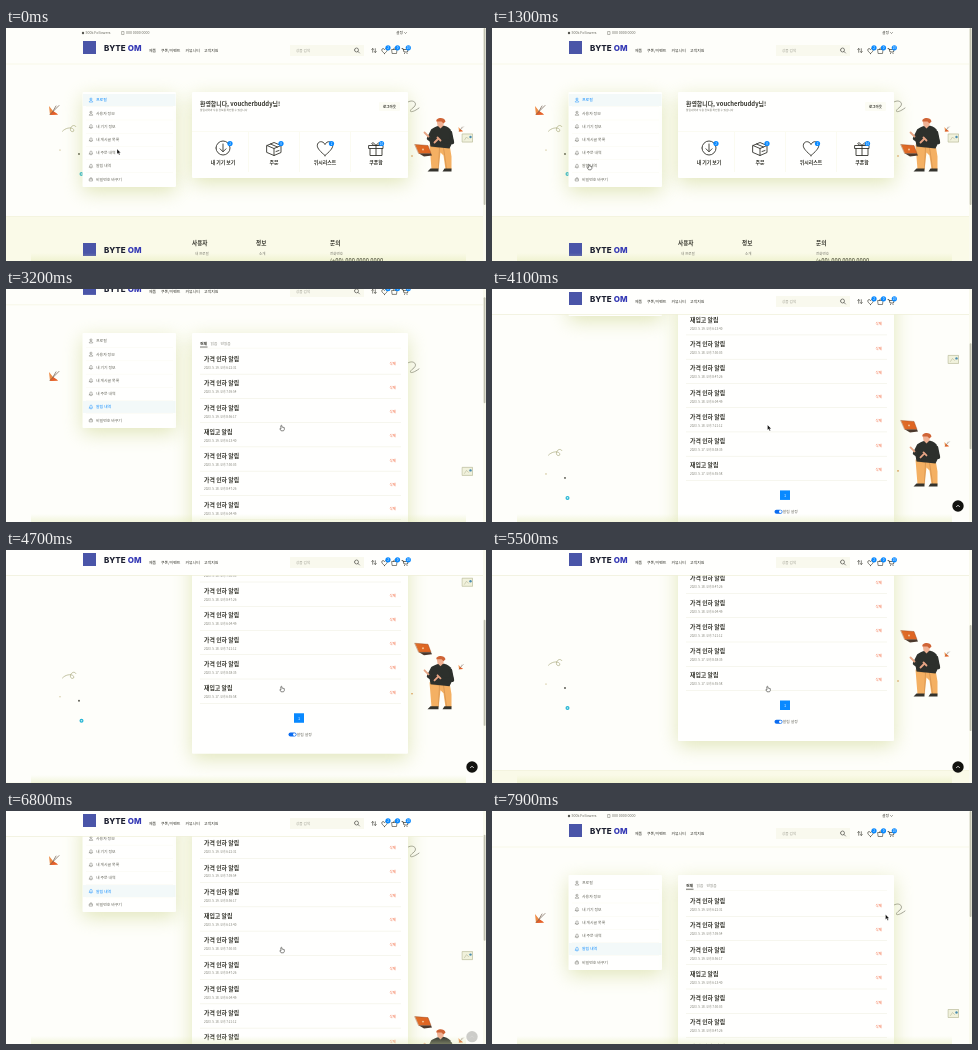
Recreate the animation shown at these times as an HTML page with a canvas. Size 480 by 233 pixels, loop 8000 ms.

```html
<!DOCTYPE html>
<html lang="ko">
<head>
<meta charset="utf-8">
<title>알림 내역</title>
<style>
html, body { margin: 0; width: 100%; height: 100%; overflow: hidden; background: #fefefa; }
canvas { display: block; width: 480px; height: 233px; }
</style>
</head>
<body>
<canvas id="stage" width="480" height="233"></canvas>
<script>
const cv = document.getElementById('stage');
const c = cv.getContext('2d');
const W = 480, H = 233, LOOP = 8000;
const dpr = window.devicePixelRatio || 1;
cv.width = W * dpr;
cv.height = H * dpr;

const FONT = '"Noto Sans CJK KR", "Noto Sans CJK", "Noto Sans", sans-serif';
const BRAND_FONT = 'Inter, "Open Sans", sans-serif';
const INK = '#33332b', BLUE = '#0989ff', RED = '#f2653c', GREY = '#85857c', BG = '#fefefa';
const PAGE_SWITCH = 1400, ROW = 24.25;

const MENU = ['프로필', '사용자 정보', '내 기기 정보', '내 게시글 목록', '내 주문 내역', '알림 내역', '비밀번호 바꾸기'];

// [time, value...] keys
const SCROLL = [[0, 0], [2450, 0], [2900, 6], [3200, 20], [3600, 66], [4100, 132], [4500, 163],
  [5000, 181], [5300, 183], [5850, 183], [6300, 138], [6800, 58], [7200, 16], [7650, 0], [8000, 0]];
const POINTER = [[0, 111, 121], [300, 110, 123], [900, 97, 136], [1500, 97, 136], [2100, 275.5, 136],
  [7800, 275.5, 136], [7880, 393.5, 103.5], [8000, 393.5, 103.5]];

const clamp = v => Math.max(0, Math.min(1, v));
const mix = (a, b, k) => a + (b - a) * k;

function at(keys, t, i = 1) {
  let n = 1;
  while (n < keys.length - 1 && t > keys[n][0]) n++;
  const a = keys[n - 1], b = keys[n];
  return mix(a[i], b[i], clamp((t - a[0]) / (b[0] - a[0])));
}

function text(s, x, y, size, color = INK, weight = 400, align = 'left', font = FONT) {
  c.font = `${weight} ${size}px ${font}`;
  c.textAlign = align;
  c.textBaseline = 'middle';
  c.fillStyle = color;
  c.fillText(s, x, y);
}

function rect(x, y, w, h, color) {
  c.fillStyle = color;
  c.fillRect(x, y, w, h);
}

function pill(x, y, w, h, r, color) {
  c.beginPath();
  c.roundRect(x, y, w, h, r);
  c.fillStyle = color;
  c.fill();
}

function disc(x, y, r, color) {
  c.beginPath();
  c.arc(x, y, r, 0, 7);
  c.fillStyle = color;
  c.fill();
}

// Draws an SVG path moved to x, y
function shape(d, x, y, fill, stroke, lw = 0.8, k = 1) {
  const p = new Path2D(d);
  c.save();
  c.translate(x, y);
  c.scale(k, k);
  c.lineCap = c.lineJoin = 'round';
  if (fill) { c.fillStyle = fill; c.fill(p); }
  if (stroke) { c.strokeStyle = stroke; c.lineWidth = lw; c.stroke(p); }
  c.restore();
}

const HEART = 'M0 5 C-3 2.5 -5.5 0 -5.5 -2 C-5.5 -5.5 -1.2 -5.8 0 -2.8 C1.2 -5.8 5.5 -5.5 5.5 -2 C5.5 0 3 2.5 0 5Z';
const USER = 'M-1.7 1.7C-1.7 0 1.7 0 1.7 1.7ZM-1 -1A1 1 0 1 0 1 -1A1 1 0 1 0 -1 -1';
const BELL = 'M-1.7 1.2H1.7L1.1 .3V-.8C.8 -2.2 -.8 -2.2 -1.1 -.8V.3ZM-.4 1.9H.4';
const LOCK = 'M-1.4 -.3H1.4V1.8H-1.4ZM-.9 -.3C-.9 -2.3 .9 -2.3 .9 -.3';

function badge(x, y, n) {
  disc(x, y, 2.6, BLUE);
  text(n, x, y + 0.2, 3.1, '#fff', 500, 'center');
}

function card(x, y, w, h) {
  c.save();
  c.shadowColor = 'rgba(196,206,120,.5)';
  c.shadowBlur = 19 * dpr;
  c.shadowOffsetY = 5 * dpr;
  pill(x, y, w, h, 1, '#fffffe');
  c.restore();
}

function brand(y) {
  rect(77, y - 8, 13, 13, '#4a55a8');
  text('BYTE', 98, y, 8, '#1d2030', 800, 'left', BRAND_FONT);
  text('OM', 135.5, y, 8, '#3438b4', 800, 'right', BRAND_FONT);
}

function header(dy, sticky) {
  c.save();
  c.translate(0, dy);
  if (sticky) {
    rect(0, 0, W, 35, '#fffffd');
    rect(0, 35, W, 0.7, '#efefd8');
  } else {
    rect(0, 35.7, W, 0.6, '#f1f1da');
    disc(77, 5, 1.2, '#56564f');
    text('500k Followers', 79.5, 5, 3.6, '#66665c');
    shape('M-1 -1.5H1V1.5H-1Z', 117, 5, null, '#77776c', 0.5);
    text('000 0000 0000', 120, 5, 3.6, '#66665c');
    text('설정', 390, 5, 3.8, INK, 500);
    shape('M-1 -.5L0 .5L1 -.5', 399.5, 5, null, INK, 0.5);
  }
  brand(21);
  [['제품', 143], ['쿠폰/이벤트', 155], ['커뮤니티', 179.5], ['고객지원', 198]]
    .forEach(([s, x]) => text(s, x, 22.5, 3.9, INK, 500));
  pill(284, 17, 74, 11, 0.5, '#f9f9ee');
  text('상품 검색', 290, 22.5, 3.6, '#a3a397');
  shape('M-2 0A2 2 0 1 0 2 0A2 2 0 1 0 -2 0M1.5 1.5L3 3', 350.5, 22, null, '#3c3c36', 0.6);
  shape('M-1.3 1.8V-2L-2.3 -1M-1.3 -2L-.4 -1M1.3 -1.8V2L.4 1M1.3 2L2.3 1', 368, 22.5, null, INK, 0.6);
  shape(HEART, 378.5, 23, null, INK, 1.3, 0.5);
  shape('M-2.5 -1H2.5L2 3H-2ZM-1.2 -1C-1.2 -3 1.2 -3 1.2 -1', 388.5, 22.5, null, INK, 0.6);
  shape('M-3 -2H-2L-1 1.5H2.5L3 -1H-1.7M-.5 3H-.4M2 3H2.1', 399, 22.5, null, INK, 0.7);
  badge(382, 19.8, '2');
  badge(391.5, 19.8, '0');
  badge(402.3, 19.8, '10');
  c.restore();
}

function sidebar(active) {
  card(76.5, 64, 93.5, 95);
  MENU.forEach((s, i) => {
    const y = 72 + i * 13.2, on = i === active;
    if (on) rect(77, y - 6, 92.5, 12, '#f3f9f9');
    const col = on ? BLUE : '#66665c';
    const icon = i < 2 ? USER : i < 6 ? BELL : LOCK;
    shape(icon, 85, y, null, col, 0.45);
    text(s, 90, y, 3.9, col);
    if (i) rect(80, y - 6.6, 87, 0.4, '#f8f8ea');
  });
}

function dashboard() {
  card(186, 64, 216, 86);
  text('환영합니다, voucherbuddy님!', 194, 75.3, 5.9, INK, 700);
  text('알림내역과 사용 정보를 확인할 수 있습니다', 194, 81.8, 2.7, '#77776c');
  pill(373, 74, 21, 9, 1, '#fcfcf4');
  text('로그아웃', 383.5, 78.3, 3.5, INK, 600, 'center');
  rect(186, 103, 216, 0.5, '#f6f6e4');
  [242, 293, 344].forEach(x => rect(x, 104, 0.5, 40, '#f6f6e4'));
  const col = '#34342e';
  shape('M-7 0A7 7 0 1 0 7 0A7 7 0 1 0 -7 0M0 -4V3.5M-3 .8L0 3.8L3 .8', 217, 120, null, col, 0.9);
  shape('M-7 -3L0 -6L7 -3V4L0 7L-7 4ZM-7 -3L0 0L7 -3M0 0V7M-3.5 -4.5L3.5 -1.5M2 3L5 2', 268, 120.5, null, col, 0.9);
  shape(HEART, 319, 120.5, null, col, 0.65, 1.4);
  shape('M-7 -3H7V0H-7ZM-6 0V7H6V0M0 -3V7M0 -3C-7 -3 -4 -9 0 -3C4 -9 7 -3 0 -3', 370, 120.5, null, col, 0.9);
  [['내 기기 보기', 217, 224, '2'], ['주문', 268, 275, '0'], ['위시리스트', 319, 325.5, '2'], ['쿠폰함', 370, 375.5, '10']]
    .forEach(([s, x, bx, n]) => {
      text(s, x, 134, 4.9, INK, 600, 'center');
      badge(bx, 115.5, n);
    });
}

function alerts() {
  card(186, 64, 216, 310);
  text('전체', 194, 75, 3.9, INK, 700);
  rect(194, 77.8, 7.5, 0.7, INK);
  text('읽음', 204.5, 75, 3.7, GREY);
  text('안읽음', 214.5, 75, 3.7, GREY);
  rect(194, 79, 201, 0.4, '#f3f3e2');
  for (let i = 0; i < 10; i++) {
    const y = 90 + i * ROW;
    text(i === 3 || i === 9 ? '재입고 알림' : '가격 인하 알림', 198, y, 5.9, INK, 700);
    const mm = String((i * 17 + 22) % 60).padStart(2, '0');
    const ss = String((i * 23 + 31) % 60).padStart(2, '0');
    text(`2023. 5. ${19 - (i >> 2)}. 오후 ${6 + i % 3}:${mm}:${ss}`, 198, y + 9, 3, '#77776c');
    text('삭제', 390, y + 4.3, 3.5, RED, 500, 'right');
    rect(194, y + 15, 201, 0.5, '#ededdc');
  }
  rect(288, 333.5, 10, 9.5, BLUE);
  text('1', 293, 338.5, 3.8, '#fff', 500, 'center');
  pill(282.5, 352.8, 8, 4, 2, '#0b6cf0');
  disc(288.4, 354.8, 1.4, '#fff');
  text('알림 설정', 290.8, 354.8, 3.8, '#66665c');
}

function laptop(x, y) {
  c.save();
  c.translate(x, y);
  shape('M-8 -6L5 -5L8 3L-4 3Z', 0, 0, '#df6421', '#8d3d18', 0.4);
  shape('M-4 3L8 3L9 5L1 6Z', 0, 0, '#49362b');
  disc(0, -1, 0.9, '#f5cba0');
  c.restore();
}

function man(x, y) {
  shape('M-10 22L10 22L12 34L12 47L6 47L4 33L1 30L-1 47L-8 47Z', x, y, '#f4b063');
  shape('M-8 24L0 25L-1 46M4 25L7 46', x, y, null, '#b9783c', 0.4);
  shape('M-7 6C-1 2 7 2 11 7L14 18L10 26L-9 24L-10 18Z', x, y, '#2d302c');
  shape('M-7 8L-11 16L-5 20M11 10L13 20L1 18', x, y, null, '#2d302c', 3.4);
  shape('M-11 14L-15 10M-5 20L-2 17M1 18L-2 15', x, y, null, '#e7a484', 1.8);
  shape('M-3 -3H4V3L1 6L-2 3Z', x, y, '#f0b193');
  shape('M-3 -1C-4 -5 5 -6 6 -1L4 1L2 -1Z', x, y, '#cf6436');
  shape('M-9 46H-1V49H-12ZM5 46H12V49H3Z', x, y, '#34332d');
}

function plane(x, y, k) {
  shape('M-5 -4L-4 5L4 4.5L-1 1Z', x, y, '#ee8a43', null, 0, k);
  shape('M-4 5L4 4.5L-1 1Z', x, y, '#e55f2b', null, 0, k);
  shape('M-4 4.5L5 -4.5M-1 1L2 -4', x, y, null, '#6f5b4c', 0.7, k);
}

function decor(list) {
  const y = (a, b) => list ? b : a;
  plane(48, y(82, 107), 1);
  shape('M-5 -5C0 -8 5 -4 1 0C-6 5 -2 7 6 1', 407, y(79, 99), null, '#77776f', 0.7);
  const sy = y(100, 295);
  c.setLineDash([1, 1]);
  shape('M-10 4C-5 -1 2 -1 4 2C5 6 -1 5 0 1C1 -4 6 -4 7 -1', 64.5, sy, null, '#a0a06e', 0.8, 0.8);
  c.setLineDash([]);
  disc(73, sy + 26, 0.9, '#4d4d43');
  disc(54, sy + 22, 0.6, '#b5a05c');
  disc(75.5, y(146, 341), 2, '#26b5d4');
  disc(75.5, y(146, 341), 0.8, '#c9f1f5');
  disc(406, y(128, 314), 0.8, '#d7873c');
  man(433.5, y(94.5, 280.5));
  laptop(417, y(122.5, 269.5));
  plane(455, y(101, 287), 0.5);
  const ey = y(110, 202.5);
  rect(456, ey - 4.5, 11, 9, '#f1f2dc');
  shape('M-5 -4H5V4H-5ZM-3 2L-1 -1L1 1', 461.5, ey, null, '#b5b899', 0.6);
  disc(464.5, ey - 1, 1.2, '#498bb0');
}

function footer(y) {
  rect(0, y, W, 160, '#fafae8');
  rect(0, y, W, 0.6, '#f1f1da');
  brand(y + 35);
  [['사용자', 186, '내 프로필'], ['정보', 250, '소개'], ['문의', 324, '전화번호']].forEach(([s, x, sub], i) => {
    text(s, x, y + 27.2, 5.6, INK, 600);
    text(sub, x + (i < 2 ? 3 : 0), y + 38, 3.5, '#77776c');
  });
  text('(+00) 000 0000 0000', 324, y + 45.3, 5.5, INK, 700);
}

function topButton(s) {
  const k = clamp((s - 35) / 50);
  if (!k) return;
  c.globalAlpha = k * k;
  const y = 217 + 16 * (1 - k);
  disc(466, y, 5.7, '#12120f');
  shape('M-1.5 .7L0 -.8L1.5 .7', 466, y, null, '#fff', 0.8);
  c.globalAlpha = 1;
}

function pointer(t) {
  const x = at(POINTER, t, 1), y = at(POINTER, t, 2);
  const hand = (t > 600 && t < 1500) || (t > 2500 && t < 3700) || (t > 4400 && t < 7800);
  if (hand) {
    shape('M-1.4 .4C-1.4 -.6 -.3 -.6 -.2 .3V1.4L2.2 2V4L1.4 5.2H-1L-2.3 3.2L-1.4 3Z', x + 0.6, y + 0.6, '#fff', '#3b3b36', 0.6);
  } else {
    shape('M0 0V5L1.2 4L2.1 6L3 5.6L2.1 3.7H3.7Z', x, y, '#111', '#fff', 0.3);
  }
}

function draw(t) {
  const s = at(SCROLL, t), list = t >= PAGE_SWITCH;
  c.setTransform(dpr, 0, 0, dpr, 0, 0);
  rect(0, 0, W, H, BG);
  c.save();
  c.translate(0, -s);
  decor(list);
  sidebar(list ? 5 : 0);
  if (list) alerts(); else dashboard();
  footer(list ? 403 : 188);
  c.restore();

  const stuck = s > 30;
  header(stuck ? mix(-32, -10, clamp((s - 30) / 16)) : -s, stuck);

  const g = c.createLinearGradient(0, 225, 0, H);
  g.addColorStop(0, 'rgba(225,232,175,0)');
  g.addColorStop(1, 'rgba(225,232,175,.4)');
  rect(25, 225, 435, 8, g);
  topButton(s);
  rect(477, 0, 3, H, '#fafaee');
  pill(477.7, s * 0.41, 1.8, list ? 106 : 177, 0.9, '#c0c0b0');
  pointer(t);
}

function tick(now) {
  draw(now % LOOP);
  requestAnimationFrame(tick);
}
draw(0);
requestAnimationFrame(tick);
</script>
</body>
</html>
```
